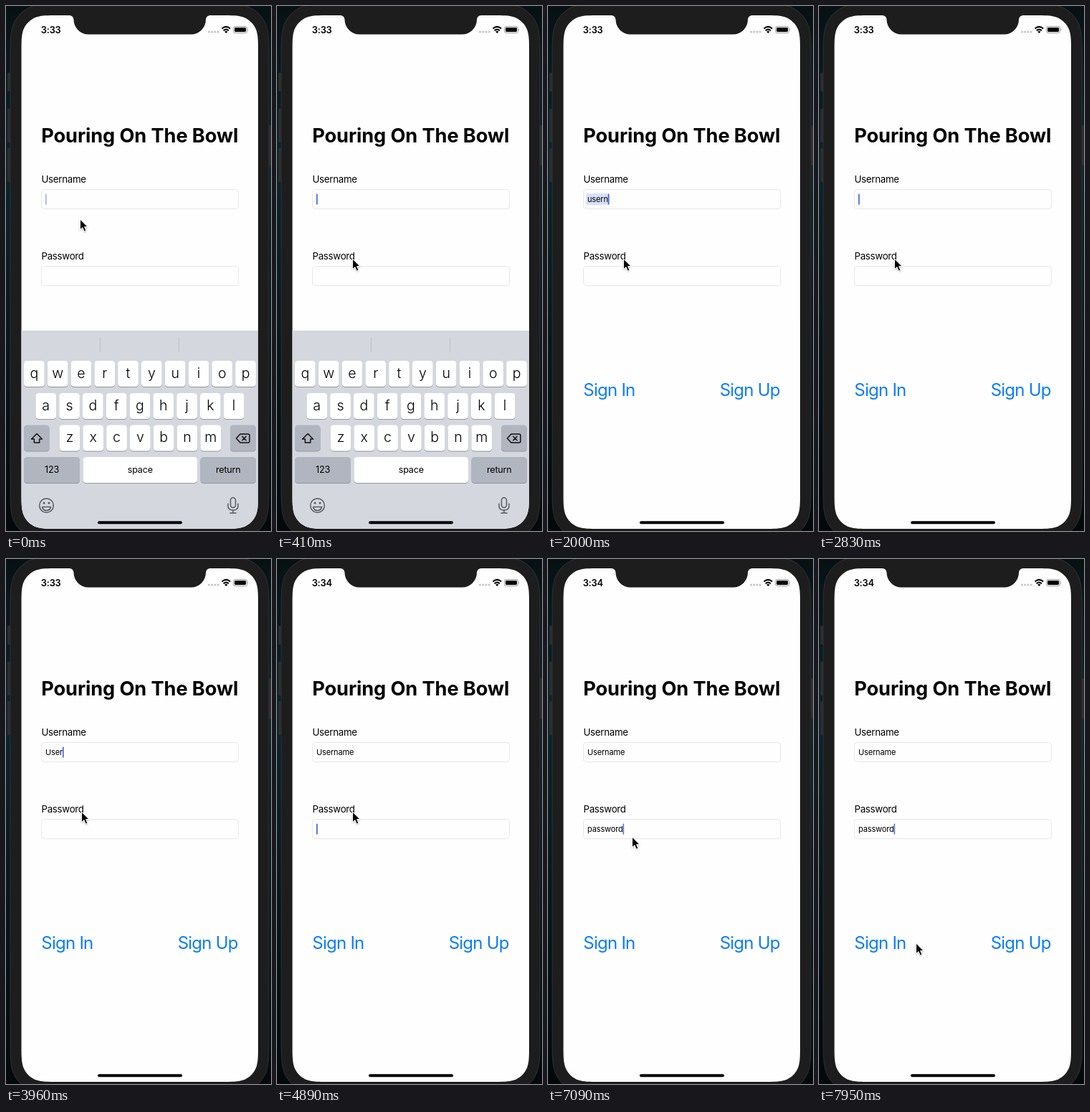
An HTML page for the animation above (8000 ms loop, 370 px wide and 731 px high).

```html
<!DOCTYPE html>
<html lang="en">
<head>
<meta charset="utf-8">
<title>Sign in</title>
<style>
  html, body { margin: 0; width: 100%; height: 100%; overflow: hidden; background: #05090b; }
  svg { display: block; width: 370px; height: 731px; font-family: Inter, Roboto, sans-serif; }
  text { white-space: pre; }
  .title { font-size: 27.2px; font-weight: 700; letter-spacing: -.1px; text-anchor: middle; }
  .label { font-size: 13.3px; letter-spacing: -.3px; }
  .entry { font-size: 11px; letter-spacing: -.15px; }
  .clock { font-size: 12.8px; font-weight: 600; text-anchor: middle; letter-spacing: -.2px; }
  .link { font-size: 24px; letter-spacing: -.75px; fill: #087cfb; }
  .key { font-size: 19.6px; font-weight: 350; text-anchor: middle; }
  .word { font-size: 12.6px; text-anchor: middle; letter-spacing: -.2px; }
  .line { fill: none; stroke: #555a61; stroke-width: 1.5; stroke-linecap: round; stroke-linejoin: round; }
</style>
</head>
<body>
<svg viewBox="0 0 370 731">
  <defs>
    <linearGradient id="desk" x2="0" y2="1">
      <stop offset="0" stop-color="#071114"/>
      <stop offset=".3" stop-color="#0a262d"/>
      <stop offset=".6" stop-color="#06191e"/>
      <stop offset="1" stop-color="#03090b"/>
    </linearGradient>
    <clipPath id="screen"><path id="screenClip"/></clipPath>
    <filter id="soft" x="-50%" y="-50%" width="200%" height="200%">
      <feDropShadow dx="0" dy="1" stdDeviation="1" flood-opacity=".3"/>
    </filter>
  </defs>

  <rect width="370" height="731" fill="url(#desk)"/>
  <g fill="#2b2e30">
    <rect x="2" y="93" width="6" height="26" rx="1"/>
    <rect x="2" y="143" width="6" height="47" rx="1"/>
    <rect x="2" y="198" width="6" height="47" rx="1"/>
    <rect x="365" y="166" width="5" height="56" rx="1"/>
  </g>
  <path id="body" fill="#1d1d1e" stroke="#303132"/>
  <path id="glass" fill="#fefefe"/>
  <path d="M88.500 12V13A6 6 0 0 1 94.500 19A20.500 20.500 0 0 0 115 39.500H258.500A20.500 20.500 0 0 0 279 19A6 6 0 0 1 285 13V12Z" fill="#1d1d1e"/>

  <text id="clock" class="clock" x="62.700" y="37.500"></text>
  <g fill="#c6c6c8">
    <circle cx="283.500" cy="36" r="1.600"/><circle cx="287.700" cy="36" r="1.600"/>
    <circle cx="291.900" cy="36" r="1.600"/><circle cx="296.100" cy="36" r="1.600"/>
  </g>
  <g fill="none" stroke="#000" stroke-width="2">
    <path d="M301.500 31.600Q307.300 26.200 313.100 31.600M303.700 34.300Q307.300 31 310.900 34.300"/>
  </g>
  <path d="M305.200 35.700Q307.300 33.900 309.400 35.700L307.300 38Z"/>
  <rect x="317.500" y="28.500" width="19" height="9" rx="2.600" fill="none" stroke="#999"/>
  <rect x="319" y="30" width="16" height="6" rx="1.400"/>
  <path d="M337.700 31.200Q339.300 33 337.700 34.800Z" fill="#999"/>

  <text class="title" x="186.700" y="189.800">Pouring On The Bowl</text>
  <text class="label" x="49.500" y="245.500">Username</text>
  <text class="label" x="49.500" y="352.500">Password</text>
  <g fill="#fefefe" stroke="#e7e7e8">
    <rect x="49.500" y="255.500" width="275" height="27" rx="4"/>
    <rect x="49.500" y="362.500" width="275" height="27" rx="4"/>
  </g>
  <rect id="mark" x="53" width="0" height="16" rx="2" fill="#426bf2" fill-opacity=".2"/>
  <text id="user" class="entry" x="55" y="273"></text>
  <text id="pass" class="entry" x="55" y="380"></text>
  <rect id="caret" width="1.600" height="15" rx=".6"/>

  <g id="links">
    <text class="link" x="49.300" y="542.600">Sign In</text>
    <text class="link" x="323.800" y="542.600" text-anchor="end">Sign Up</text>
  </g>

  <g id="keyboard" clip-path="url(#screen)">
    <rect x="21" y="452" width="332" height="277" fill="#d4d7de"/>
    <path d="M131.500 462V482M241.500 462V482" stroke="#bbbfc6"/>
    <g id="keys"></g>
    <path class="line" style="stroke:#111" d="M43 595.500L50.500 603H46.700V608H39.300V603H35.500Z"/>
    <path class="line" style="stroke:#111" d="M327 596H338Q340 596 340 598V606Q340 608 338 608H327L321.500 602ZM329.800 599.300L335.200 604.700M335.200 599.300L329.800 604.700"/>
    <circle class="line" cx="56.500" cy="695.500" r="9.800"/>
    <path class="line" d="M50.500 697.500H62.500Q61.500 702.500 56.500 702.500T50.500 697.500Z"/>
    <circle cx="53" cy="692" r="1.500" fill="#555a61"/><circle cx="60" cy="692" r="1.500" fill="#555a61"/>
    <rect class="line" x="313.500" y="684.500" width="7" height="14" rx="3.500"/>
    <path class="line" d="M310 693V696Q310 702 317 702T324 696V693M317 702V706M313 706H321"/>
  </g>
  <rect x="128" y="717.300" width="118" height="4" rx="2"/>

  <path id="mouse" filter="url(#soft)" d="M.5 0V14.600L3.900 11.500L6.300 16.900L8.900 15.800L6.600 10.500H11Z" stroke="#fff" stroke-width="1" stroke-linejoin="round"/>
</svg>

<script>
const LOOP = 8000;
const $ = id => document.getElementById(id);

// [time, text, highlighted]
const USER = [
  [0, ''], [830, 'u'], [1000, 'us'], [1300, 'use'], [1530, 'user'], [1830, 'usern'],
  [2000, 'usern', true], [2240, 'user'], [2360, 'use'], [2540, 'us'], [2660, 'u'], [2830, ''],
  [3370, 'U'], [3670, 'Us'], [3790, 'Use'], [3960, 'User'], [4080, 'Usern'],
  [4250, 'Userna'], [4430, 'Usernam'], [4480, 'Username']
];
const PASS = [
  [0, ''], [5430, 'p'], [5550, 'pa'], [5780, 'pas'], [5960, 'pass'], [6260, 'passw'],
  [6380, 'passwo'], [6500, 'passwor'], [6670, 'passwor', true], [6730, 'password']
];
// [time, x, y]
const MOUSE = [
  [0, 103, 297], [60, 103, 314], [120, 103, 358], [180, 104, 398], [240, 104, 417],
  [290, 105, 403], [350, 105, 374], [410, 105, 352]
];

const at = (steps, t) => steps.findLast(s => s[0] <= t);

// Rounded rectangle whose corners ease into the sides.
function smoothRect(x, y, w, h, r) {
  const corner = [[1.53, 0], [1.09, 0], [.87, 0], [.63, .075], [.373, .169],
                  [.169, .373], [.075, .63], [0, .87], [0, 1.09], [0, 1.53]];
  const place = (right, bottom) => {
    const pts = corner.map(([a, b]) => [
      right ? x + w - a * r : x + a * r,
      bottom ? y + h - b * r : y + b * r
    ]);
    if (right !== bottom) pts.reverse();
    return `${pts[0]}C${pts.slice(1).join(' ')}`;
  };
  return `M${place(false, false)}L${place(false, true)}L${place(true, true)}L${place(true, false)}Z`;
}

function addKey(x, y, w, label, cls = 'key', fill = '#fff') {
  const baseline = y + (cls === 'key' ? 23.5 : 22);
  $('keys').insertAdjacentHTML('beforeend',
    `<rect x="${x}" y="${y + 1}" width="${w}" height="36" rx="4.300" fill="#94979d"/>
     <rect x="${x}" y="${y}" width="${w}" height="36" rx="4.300" fill="${fill}"/>
     <text class="${cls}" x="${x + w / 2}" y="${baseline}">${label}</text>`);
}

function build() {
  const glass = smoothRect(21.5, 13, 330.5, 715, 33);
  $('glass').setAttribute('d', glass);
  $('screenClip').setAttribute('d', glass);
  $('body').setAttribute('d', smoothRect(6, -3, 361, 747, 48));

  const gray = '#b1b5bf';
  [['qwertyuiop', 25, 494], ['asdfghjkl', 41.4, 539], ['zxcvbnm', 74.6, 583.5]]
    .forEach(([row, x, y]) => [...row].forEach((c, i) => addKey(x + i * 32.8, y, 28.7, c)));
  addKey(25, 583.5, 35.5, '', 'word', gray);
  addKey(313, 583.5, 36, '', 'word', gray);
  addKey(25, 628, 78, '123', 'word', gray);
  addKey(107.5, 628, 159.5, 'space', 'word');
  addKey(271.5, 628, 77.5, 'return', 'word', gray);
}

function mousePos(t) {
  if (t < 7090) return at(MOUSE, t).slice(1);
  if (t >= 7950) return [135, 535];
  const p = Math.min(1, Math.floor((t - 7090) / 57.1) / 14);
  const ease = 1 - (1 - p) ** 1.8;
  return [117 + 14 * ease, 387 + 147 * ease];
}

function render(t) {
  const inPass = t >= 4780;
  const user = at(USER, t), pass = at(PASS, t);
  $('user').textContent = user[1];
  $('pass').textContent = pass[1];
  $('clock').textContent = t < 4890 ? '3:33' : '3:34';

  const active = inPass ? pass : user;
  const top = inPass ? 368 : 261;
  const width = active[1] ? $(inPass ? 'pass' : 'user').getComputedTextLength() : 0;
  $('caret').setAttribute('x', 55 + width);
  $('caret').setAttribute('y', top + .5);
  $('caret').setAttribute('opacity', Math.min(1, .5 + t / 700));
  $('caret').setAttribute('fill', t < 6730 ? '#3a5cd8' : '#4675e4');
  $('mark').setAttribute('y', top);
  $('mark').setAttribute('width', active[2] ? width + 4 : 0);

  $('keyboard').style.display = t < 830 ? '' : 'none';
  $('links').style.display = t < 830 ? 'none' : '';
  $('mouse').setAttribute('transform', `translate(${mousePos(t)})`);
}

build();
const start = performance.now();
function tick(now) {
  render(Math.max(0, now - start) % LOOP);
  requestAnimationFrame(tick);
}
render(0);
requestAnimationFrame(tick);
</script>
</body>
</html>
```
